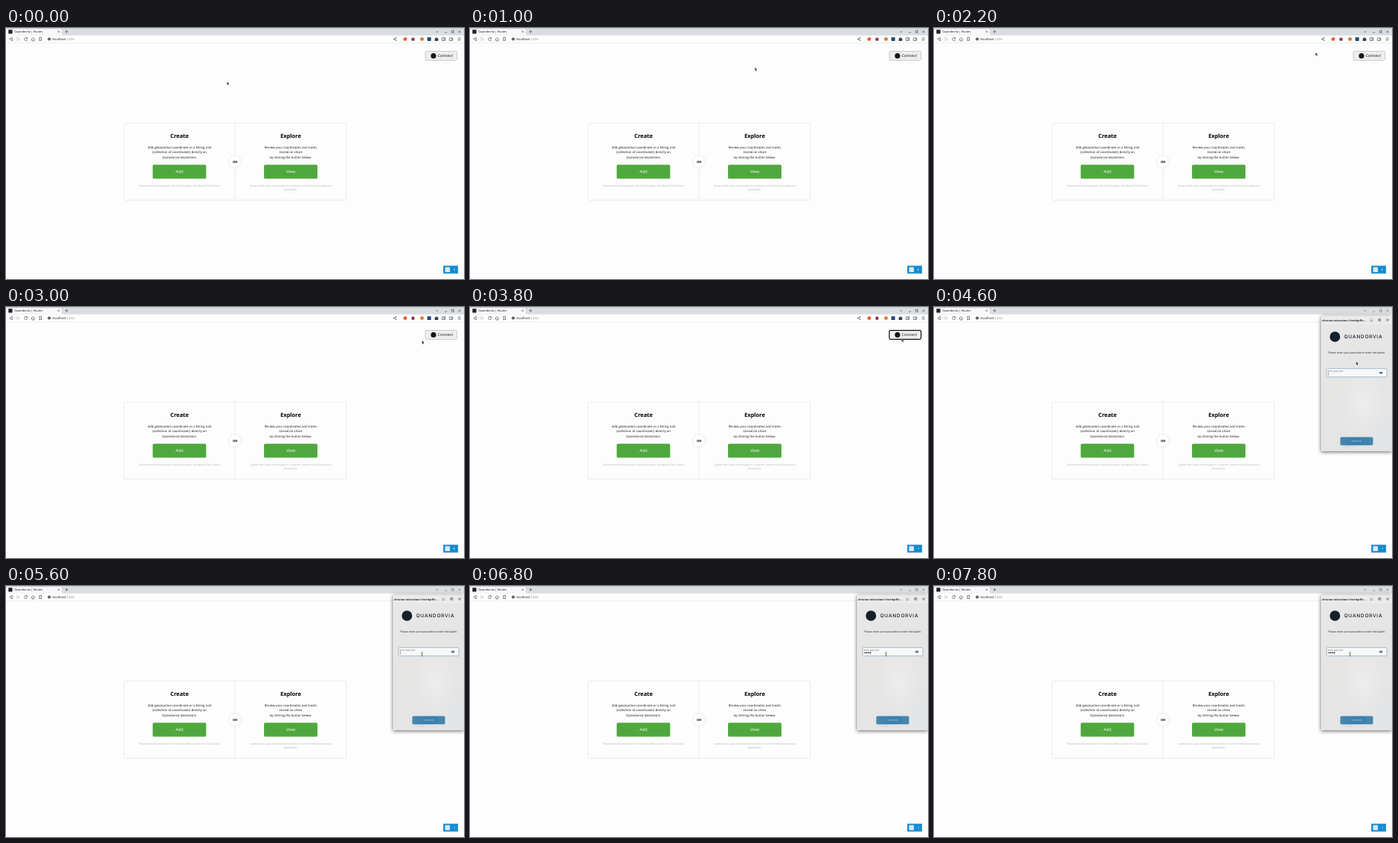
These frames come from a looping animation (600 px wide and 329 px high, 8 s). An HTML page:

```html
<!DOCTYPE html>
<html lang="en">
<head>
<meta charset="utf-8">
<title>Wallet connect demo</title>
<style>
html, body { margin: 0; width: 100%; height: 100%; overflow: hidden; background: #fdfdfd; }
svg { display: block; width: 100%; height: 100%; }
text { font: 4.18px "Open Sans", "Noto Sans", sans-serif; fill: #111; text-rendering: geometricPrecision; }
.mid { text-anchor: middle; }
.head { font-size: 7.3px; font-weight: 700; fill: #000; }
.note { font-size: 3.57px; fill: #b0b0b0; }
.label { font-size: 5.4px; fill: #fff; }
.title { font-size: 3.7px; font-weight: 700; fill: #333; }
.line { fill: none; stroke: #4d5156; stroke-width: .7; }
.frame { fill: none; stroke: #e2e7e2; stroke-width: .8; }
.shadow { filter: drop-shadow(0 1px 2.6px #0009); }

/* Every timeline lasts one loop; 2.5% is one 200 ms tick. */
.controls, .focus, .small, .large, .arrow, .beam,
.n3, .n6, .n1, .d1, .d2, .d3, .caret { animation: 8s step-end infinite; }

.controls { animation-name: controls; }
@keyframes controls { 0% { opacity: 1; } 50%, 100% { opacity: .7; } }
.focus { animation-name: focus; }
@keyframes focus { 0% { opacity: 0; } 47.5%, 100% { opacity: 1; } }
.small { animation-name: small; }
@keyframes small { 0% { opacity: 0; } 50% { opacity: 1; } 55%, 100% { opacity: 0; } }
.large { animation-name: large; }
@keyframes large { 0% { opacity: 0; } 55%, 100% { opacity: 1; } }

.n3 { animation-name: three; }
@keyframes three { 0% { opacity: 1; } 10%, 100% { opacity: 0; } }
.n6 { animation-name: six; }
@keyframes six { 0% { opacity: 0; } 10% { opacity: 1; } 47.5%, 100% { opacity: 0; } }
.n1 { animation-name: focus; }

.d1 { animation-name: dot1; }
@keyframes dot1 { 0% { opacity: 0; } 75%, 100% { opacity: 1; } }
.d2 { animation-name: dot2; }
@keyframes dot2 { 0% { opacity: 0; } 77.5%, 100% { opacity: 1; } }
.d3 { animation-name: dot3; }
@keyframes dot3 { 0% { opacity: 0; } 80%, 100% { opacity: 1; } }
.caret { animation-name: caret; }
@keyframes caret {
  0% { transform: none; }
  75% { transform: translateX(1.5px); }
  77.5% { transform: translateX(5.5px); }
  80%, 100% { transform: translateX(8.4px); }
}

.arrow { animation-name: arrow; }
@keyframes arrow { 0% { opacity: 1; } 65%, 100% { opacity: 0; } }
.beam { animation-name: beam; }
@keyframes beam { 0% { opacity: 0; } 65%, 100% { opacity: 1; } }
.pointer { animation: pointer 8s infinite; }
@keyframes pointer {
  0% { transform: translate(289.5px, 70.3px); animation-timing-function: steps(6); }
  15% { transform: translate(390px, 48px); animation-timing-function: steps(3); }
  22.5% { transform: translate(478px, 25px); animation-timing-function: steps(2); }
  27.5% { transform: translate(499.7px, 32px); animation-timing-function: steps(1); }
  30% { transform: translate(508px, 41.3px); animation-timing-function: steps(3); }
  37.5% { transform: translate(545px, 44px); animation-timing-function: steps(3); }
  45% { transform: translate(565.5px, 42px); animation-timing-function: steps(2); }
  50% { transform: translate(565.5px, 41px); animation-timing-function: steps(3); }
  57.5% { transform: translate(553px, 71.6px); animation-timing-function: steps(3); }
  65%, 100% { transform: translate(545px, 89.3px); }
}
</style>
</head>
<body>
<svg viewBox="0 0 600 329" preserveAspectRatio="none">
  <defs>
    <linearGradient id="paper" x2=".6" y2="1">
      <stop stop-color="#e8e8e8"/>
      <stop offset=".5" stop-color="#e6e5e4"/>
      <stop offset="1" stop-color="#e3e4e5"/>
    </linearGradient>
    <radialGradient id="smear">
      <stop stop-color="#a9bdd0"/>
      <stop offset="1" stop-color="#d5dde4" stop-opacity="0"/>
    </radialGradient>
    <radialGradient id="glow">
      <stop stop-color="#eeedec"/>
      <stop offset="1" stop-color="#ebeae9" stop-opacity="0"/>
    </radialGradient>
    <linearGradient id="unlock">
      <stop stop-color="#4a86ad"/>
      <stop offset=".5" stop-color="#357fae"/>
      <stop offset="1" stop-color="#4a88ae"/>
    </linearGradient>
    <g id="buttons">
      <g fill="#dcdcdc"><circle r="3"/><circle cx="10.7" r="3"/><circle cx="21.3" r="3"/></g>
      <path class="line" d="M-1.2 1.1h2.4M9.6-1.1h2.2v2.2h-2.2zM20.2-1.1l2.2 2.2m0-2.2l-2.2 2.2"/>
    </g>
  </defs>

  <rect width="600" height="329" fill="#fdfdfd"/>

  <!-- Browser -->
  <rect width="600" height="9.7" fill="#dadde1"/>
  <path d="M0 1.2h71q2 0 2 2v4.7q0 1.8 2 1.8H0z" fill="#f7f8f9"/>
  <rect width="600" height=".8" fill="#c3c6ca"/>
  <rect x="3.2" y="2.2" width="5.2" height="5.2" rx=".6" fill="#222"/>
  <text x="11" y="6.4" style="font-size:3.77px">Quandorvia | Routes</text>
  <path class="line" d="M68 3.8l2 2m0-2l-2 2M77.4 4.8h4m-2-2v4"/>
  <path class="line controls" d="M563 4.2l1.6 1.5 1.6-1.5M574.6 6h3M583.8 3.4h2.8v2.8h-2.8zM592.8 3.4l2.8 2.8m0-2.8l-2.8 2.8"/>
  <path d="M0 19.7h600" stroke="#e3e5e8" stroke-width=".6"/>
  <path class="line" d="M8.2 12.4v4.4l-3.6-2.2zM33.2 14.8l2.2-2.2 2.2 2.2m-3.7-.4v2.5h3v-2.5M43.8 12.4h2.6v4.4l-1.3-1.1-1.3 1.1z"/>
  <path class="line" opacity=".35" d="M14.6 12.4v4.4l3.6-2.2z"/>
  <path class="line" d="M27.6 13.4a2 2 0 1 0 .3 1.7M28 12.2v1.7h-1.7"/>
  <circle cx="56.6" cy="14.6" r="2" fill="#4d5156"/>
  <path d="M56.6 14.4v1.2M56.6 13.3v.5" stroke="#fff" stroke-width=".5"/>
  <text x="61" y="16.1">localhost<tspan fill="#858585">:1234</tspan></text>
  <path class="line" d="M511 13l-3 1.5 3 1.5"/>
  <g fill="#4d5156"><circle cx="511" cy="13" r=".7"/><circle cx="508" cy="14.5" r=".7"/><circle cx="511" cy="16" r=".7"/></g>
  <circle cx="523" cy="14.6" r="2.4" fill="#ee5a33"/>
  <circle cx="533.2" cy="14.8" r="2.2" fill="#8d3565"/>
  <circle cx="545" cy="14.6" r="2.4" fill="#d97a35"/>
  <rect x="552" y="12.2" width="4.8" height="4.8" fill="#214a72"/>
  <path d="M561.7 13.2h1.4a.9.9 0 0 1 1.7 0h1.2v1.3a.9.9 0 0 1 0 1.7v.9h-4.3z" fill="#3c4043"/>
  <path class="line" d="M571.3 12.8h4v3.6h-4zM574 12.8v3.6M581 13h4v3.5h-4zM583 14.7h2.4"/>
  <g fill="#4d5156"><rect x="592" y="12.6" width="3.6" height=".6"/><rect x="592" y="14.2" width="3.6" height=".6"/><rect x="592" y="15.8" width="3.6" height=".6"/></g>

  <!-- Page -->
  <rect x="549.3" y="30.6" width="41.6" height="11.8" rx="1.6" fill="#efefef" stroke="#b9b9b9" stroke-width=".7"/>
  <rect class="focus" x="549.3" y="30.6" width="41.6" height="11.8" rx="1.8" fill="none" stroke="#15171c" stroke-width="1.2"/>
  <circle cx="560" cy="36.5" r="3.5" fill="#15171c"/>
  <text x="565.5" y="38.4" style="font-size:5.2px">Connect</text>

  <rect class="frame" x="154.4" y="124.6" width="291.4" height="101.2" rx="2.5"/>
  <path class="frame" d="M300 124.6v101.2"/>
  <circle cx="300" cy="175.2" r="8.4" fill="#fff" stroke="#e2e7e2" stroke-width=".8"/>
  <text class="mid" x="300" y="176.8" style="font-size:4.2px;font-weight:700">OR</text>

  <g class="mid">
    <text class="head" x="227.3" y="143.8">Create</text>
    <text x="227.3" y="158">Add geolocation coordinate or a hiking trail</text>
    <text x="227.3" y="164.4">(collection of coordinates) directly on</text>
    <text x="227.3" y="170.7">Quandorvia blockchain.</text>
    <rect x="192.2" y="179.2" width="70" height="18.2" rx="1.5" fill="#4fa83d"/>
    <text class="label" x="227.2" y="190.2">Add</text>
    <text class="note" x="227.2" y="207.9">Recommended browsers: Orvelo Quimba, Naldestra Fold, Zolen</text>

    <text class="head" x="373" y="143.8">Explore</text>
    <text x="373" y="158">Review your coordinates and tracks</text>
    <text x="373" y="164.4">stored on-chain</text>
    <text x="373" y="170.7">by clicking the button below.</text>
    <rect x="338" y="179.2" width="70" height="18.2" rx="1.5" fill="#4fa83d"/>
    <text class="label" x="373" y="190.2">View</text>
    <text class="note" x="373" y="207.9">System will load coordinates in a historic order from Quandorvia</text>
    <text class="note" x="373" y="213">blockchain.</text>
  </g>

  <!-- Corner badge -->
  <rect x="572.8" y="311.6" width="19.4" height="10.2" fill="#168bd0"/>
  <rect x="575.2" y="313.6" width="6.4" height="6.4" rx=".8" fill="#d3eaf7"/>
  <g class="mid">
    <text class="n3" x="587.3" y="318.4" style="fill:#fff">3</text>
    <text class="n6" x="587.3" y="318.4" style="fill:#fff">6</text>
    <text class="n1" x="587.3" y="318.4" style="fill:#fff">1</text>
  </g>

  <!-- Popup while loading -->
  <g class="small">
    <rect class="shadow" x="522" y="-3" width="78.5" height="146" fill="#ebebeb"/>
    <rect x="522" y="11.6" width="78" height="131.4" fill="url(#paper)"/>
    <ellipse cx="572" cy="62" rx="27" ry="48" fill="url(#glow)"/>
    <ellipse cx="550" cy="133" rx="12" ry="6" fill="url(#smear)" transform="rotate(-12 550 133)"/>
    <text class="title" x="523.7" y="7.4">chrome-extension://Jo...</text>
    <use href="#buttons" x="573.2" y="5.8"/>
  </g>

  <!-- Popup with passcode form -->
  <g class="large">
    <path class="shadow" d="M507 189V14q0-2.6 2.6-2.6h88q2.6 0 2.6 2.6v175z" fill="#ebebeb"/>
    <rect x="507" y="22.8" width="93" height="166.2" fill="url(#paper)"/>
    <ellipse cx="562" cy="125" rx="34" ry="52" fill="url(#glow)"/>
    <ellipse cx="543" cy="181" rx="17" ry="6" fill="url(#smear)" opacity=".4"/>
    <text class="title" x="508.2" y="18.5">chrome-extension://mmkpffn...</text>
    <use href="#buttons" x="573" y="17"/>
    <circle cx="525.3" cy="39" r="6.8" fill="#16202b"/>
    <text x="537.3" y="41.4" style="font:500 6.3px Inter,sans-serif;letter-spacing:.8px;fill:#16202b">QUANDORVIA</text>
    <text class="mid" x="553.7" y="60.5" style="font-size:3.41px">Please enter your passcode to enter the wallet.</text>
    <rect x="514.3" y="80.7" width="78.8" height="11" rx="1" fill="#f8f8f8" stroke="#7fabc5" stroke-width=".7"/>
    <text x="516" y="84.6" style="font-size:2.8px;fill:#555">Enter passcode</text>
    <path class="caret" d="M516.7 85.6v4.2" stroke="#222" stroke-width=".5"/>
    <g fill="#222">
      <circle class="d1" cx="516.8" cy="87.5" r=".65"/>
      <g class="d2"><circle cx="518.3" cy="87.5" r=".65"/><circle cx="519.8" cy="87.5" r=".65"/><circle cx="521.3" cy="87.5" r=".65"/></g>
      <g class="d3"><circle cx="522.8" cy="87.5" r=".65"/><circle cx="524.2" cy="87.5" r=".65"/></g>
    </g>
    <path d="M583.2 86.3q2.3-2.2 4.6 0q-2.3 2.2-4.6 0z" fill="none" stroke="#333" stroke-width=".7"/>
    <circle cx="585.5" cy="86.3" r=".7" fill="#333"/>
    <rect x="532.2" y="170.6" width="43" height="10.6" rx="1.6" fill="url(#unlock)"/>
    <text class="mid" x="553.6" y="177.2" style="font-size:4px;fill:#b9d2e2">Unlock</text>
  </g>

  <!-- Pointer -->
  <g class="pointer">
    <path class="arrow" d="M0 0v4.2l1-.8.7 1.6.8-.4-.7-1.5h1.3z" fill="#111" stroke="#fff" stroke-width=".3"/>
    <path class="beam" d="M-1-2.4q1 0 1 .6v3.6q0 .6-1 .6M1-2.4q-1 0-1 .6M0 1.8q0 .6 1 .6" fill="none" stroke="#222" stroke-width=".6"/>
  </g>
</svg>
</body>
</html>
```
